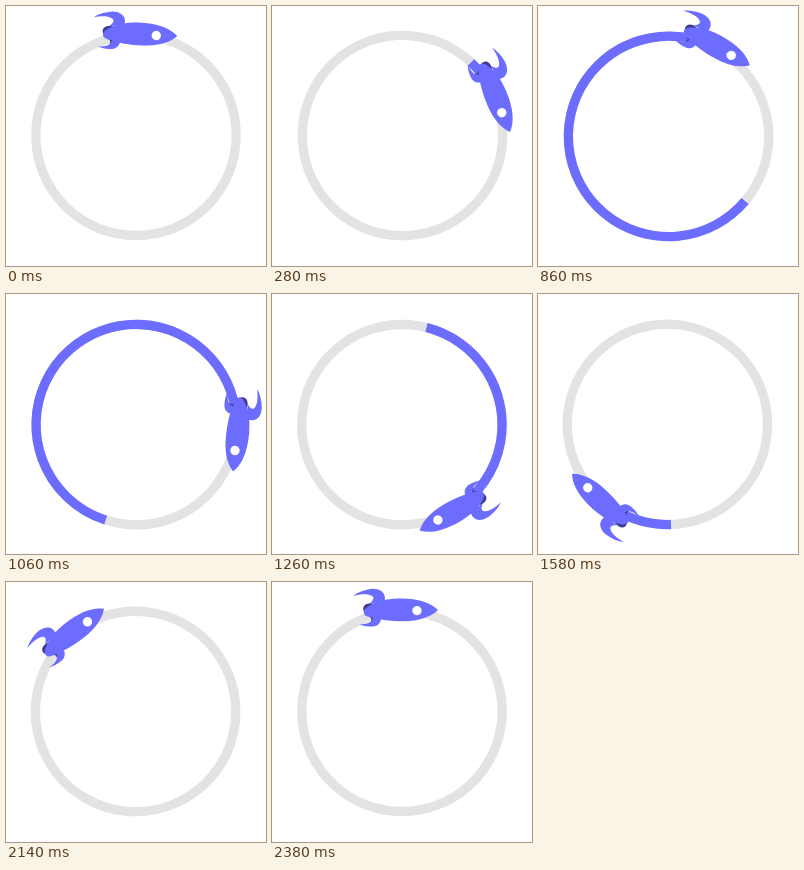
An HTML page for the animation above (2400 ms loop, 260 px wide and 260 px high).

```html
<!DOCTYPE html>
<html lang="en">
<head>
<meta charset="utf-8">
<title>Rocket loader</title>
<style>
  html, body { margin: 0; width: 100%; height: 100%; overflow: hidden; background: #fff; }
  svg { display: block; width: 100%; height: 100%; }
  circle.ring { fill: none; stroke-width: 9.3; }
</style>
</head>
<body>
<svg viewBox="0 0 260 260">
  <g id="orbit">
    <circle class="ring" cx="130" cy="129.3" r="100.2" stroke="#e3e3e3"/>
    <circle class="ring" id="trail" cx="130" cy="129.3" r="100.2" stroke="#6c6cff"
      pathLength="360" transform="rotate(-89 130 129.3)"/>
  </g>
  <g id="rocket" fill="#6c6cff">
    <path fill="#3d3c8f" d="M106 20C98 19 95 23 97 28L104 35L103 42L109 41L112 32Z"/>
    <path d="M118 19C121 10 114 5.5 106 5.5C99 6 92 8 87 11.5C95 10 101 10 105 12C109 14 107 17 103 20Z"/>
    <path d="M114 35C113 41 109 43.5 103 43C99 43 95 42 92 40.5C99 40.5 104 40 106 34Z"/>
    <path d="M171 30C164 22 151 17 132 16.5C119 16.5 110 18 104 21.5C99 24 96 26 97 30C98 33 102 33 106 34.5C116 38 128 39.5 142 39.5C155 39.3 166 35 171 30Z"/>
    <circle cx="150" cy="29.5" r="4.7" fill="#fff"/>
  </g>
</svg>
<script>
  const LOOP = 2400;
  const [orbit, trail, rocket] = ['orbit', 'trail', 'rocket'].map(id => document.getElementById(id));

  // Cubic bezier easing with handles (.32, 0) and (.04, 1), solved by bisection.
  function ease(x) {
    if (x <= 0) return 0;
    if (x >= 1) return 1;
    let low = 0, high = 1, u;
    for (let i = 0; i < 24; i++) {
      u = (low + high) / 2;
      const v = 1 - u;
      if (0.96 * u * v * v + 0.12 * u * u * v + u * u * u < x) low = u;
      else high = u;
    }
    return u * u * (3 - 2 * u);
  }

  const sweep = (p, from, to) => 360 * ease((p - from) / (to - from));
  const spin = (node, angle) => node.setAttribute('transform', `rotate(${angle} 130 130)`);

  function draw(now) {
    const p = now % LOOP / LOOP;
    const head = sweep(p, 0.01, 0.96);
    const tail = sweep(p, 0.355, 1);
    const length = Math.max(0, head - tail);
    spin(orbit, 360 * p);
    spin(rocket, 360 * p + head);
    trail.setAttribute('stroke-dasharray', `0 ${tail} ${length} 400`);
    trail.style.visibility = length > 0.1 ? 'visible' : 'hidden';
  }

  const start = performance.now();
  function tick() {
    draw(performance.now() - start);
    requestAnimationFrame(tick);
  }
  tick();
</script>
</body>
</html>
```
